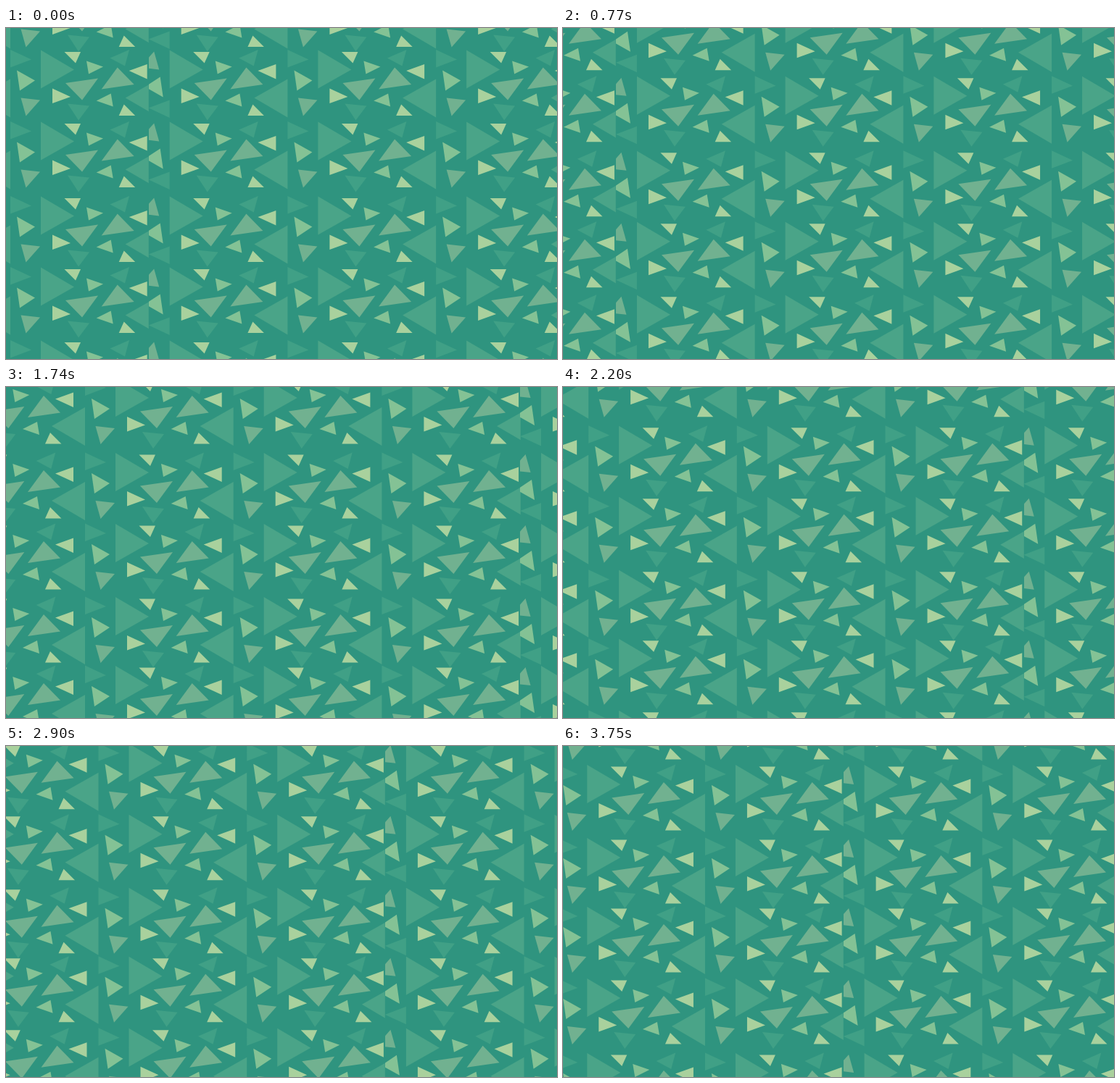
Animation of 760 by 457 pixels, one loop 3.85 s. Source, as an HTML page with a canvas:

```html
<!DOCTYPE html>
<html lang="en">
<head>
<meta charset="utf-8">
<title>Drifting triangles</title>
<style>
  html, body { margin: 0; height: 100%; overflow: hidden; background: #2f947f; }
  canvas { display: block; }
</style>
</head>
<body>
<canvas id="stage" width="760" height="457"></canvas>
<script>
const ctx = document.getElementById('stage').getContext('2d');
const W = 760, H = 457, LOOP = 3850;
const GROUND = '#2f947f', BIG = '#4aa488', DIM = '#40a086',
      MID = '#71b190', GREEN = '#84c295', PALE = '#a9d19d';

// The pattern sheet: four columns and five uneven rows, repeated in both directions.
const SHEET_W = 791.8, SHEET_H = 496, COLUMN = 204.7, INSET = 28.7;
const ROWS = [0, 103, 201, 302, 397];

// Each triangle: colour, then x,y of its three corners.
const paired = [
  [BIG, 0, 0, 0, 53, 46, 27],
  [PALE, 32.5, 2.5, 55, 2.5, 48, 18],
  [GREEN, 63, 15, 86, 23, 66, 33],
  [MID, 34, 45.5, 79, 39, 57, 69],
  [PALE, 16, 53, 16, 73.5, 41, 64.5]
];
const single = [
  [DIM, 95.5, 11, 122, -0.5, 116, 22],
  [DIM, 37, 74, 67, 77, 52, 97]
];
const edge = [
  [DIM, -42, -0.5, -42, 24, -13, 13],
  [GREEN, -33, 28, -8, 42, -29, 56],
  [MID, -27.5, 66, -1, 69, -20.5, 91]
];

// Half turn that maps x to sumX - x and y to 93 - y.
const turn = (list, sumX) => list.map(([color, ...p]) =>
  [color, ...p.map((v, i) => (i % 2 ? 93 : sumX) - v)]);

const body = [...single, ...paired, ...turn(paired, 162.7)];
const firstColumn = [...turn(edge, -42), ...body];
const otherColumn = [...edge, ...body];

function drawTile(list, x, y) {
  for (const [color, ax, ay, bx, by, cx, cy] of list) {
    ctx.fillStyle = color;
    ctx.beginPath();
    ctx.moveTo(x + ax, y + ay);
    ctx.lineTo(x + bx, y + by);
    ctx.lineTo(x + cx, y + cy);
    ctx.fill();
  }
}

function drawSheet(left, top) {
  ctx.save();
  ctx.beginPath();
  ctx.rect(Math.round(left), 0, SHEET_W, H);
  ctx.clip();
  for (let c = 0; c < 4; c++)
    for (const row of ROWS)
      drawTile(c ? otherColumn : firstColumn, left + INSET + c * COLUMN, top + row);
  ctx.restore();
}

function draw(ms) {
  const t = ms < 60 ? 0 : Math.min(ms, 3750);
  const left = 197 - 0.1605 * t, top = 129.4 - 0.0812 * t;
  ctx.fillStyle = GROUND;
  ctx.fillRect(0, 0, W, H);
  for (let i = -1; i < 2; i++)
    for (let j = -1; j < 2; j++)
      drawSheet(left + i * SHEET_W, top + j * SHEET_H);
}

const start = performance.now();
function frame() {
  draw((performance.now() - start) % LOOP);
  requestAnimationFrame(frame);
}
frame();
</script>
</body>
</html>
```
